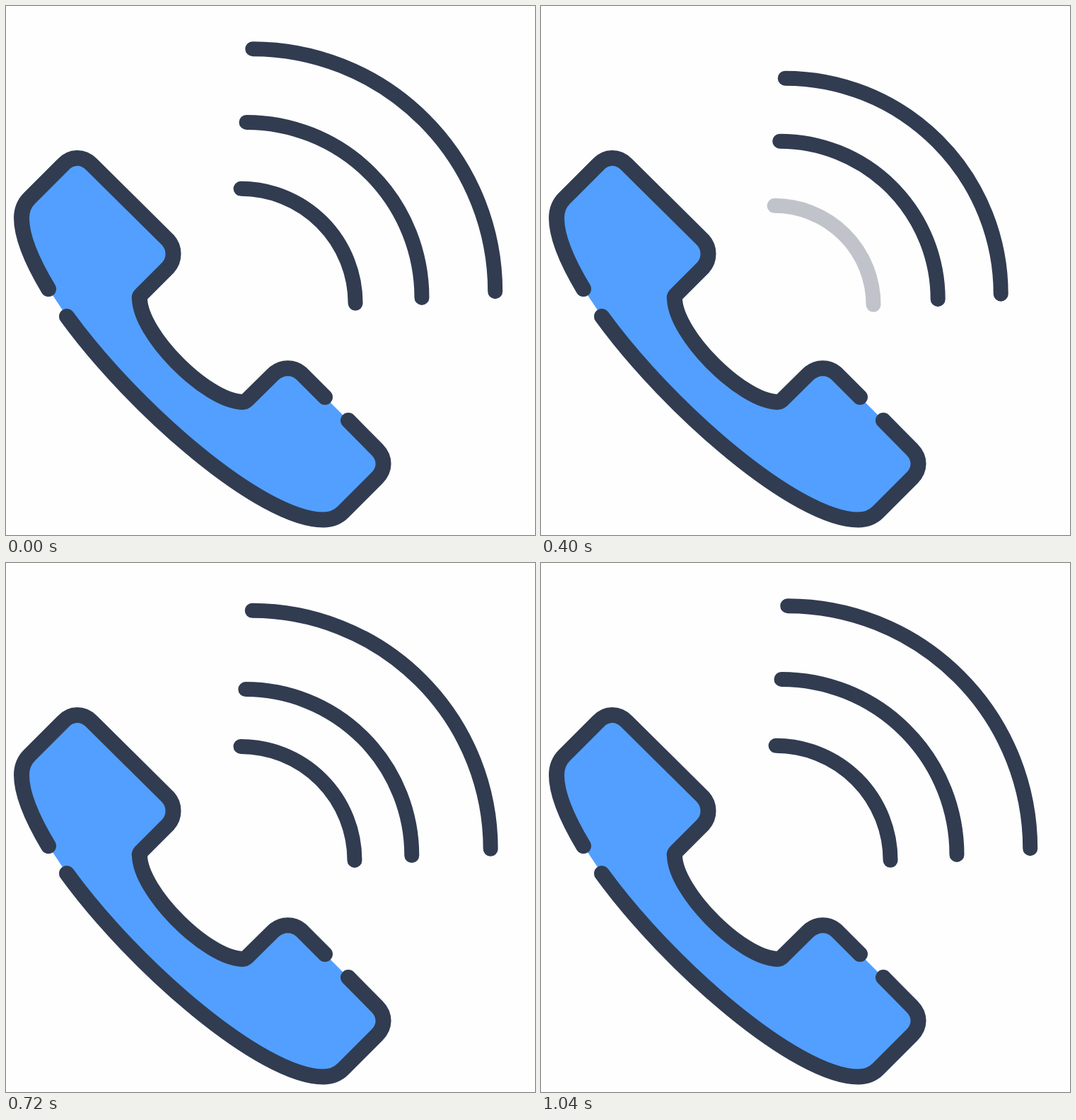
Write an HTML page that moves like this. It is 748 by 748 pixels and loops after 1.36 s.

```html
<!DOCTYPE html>
<html lang="en">
<head>
<meta charset="utf-8">
<title>Ringing phone</title>
<style>
  html, body { margin: 0; width: 100%; height: 100%; overflow: hidden; background: #fefefe; }
  svg { display: block; width: 100vw; height: 100vh; }
  .line { fill: none; stroke: #313c50; stroke-width: 22; stroke-linecap: round; stroke-linejoin: round; }
  #rings .line { stroke-width: 21; }
</style>
</head>
<body>
<svg viewBox="0 0 748 748">
  <path id="body" fill="#529fff"/>
  <path id="upper" class="line"/>
  <path id="lower" class="line"/>
  <g id="rings"></g>
</svg>
<script>
  const STEP = 80, LOOP = 1360, QUIET = 3, CYCLE = 10;
  const $ = id => document.getElementById(id);

  // Two outline strokes; joined end to end they enclose the blue body.
  const upper = "60 400C36 360 22 326 22 300C22 288 25.5 279.5 33 272L80.5 224.5" +
    "C92 212 109 212 121 224L229 331C239 342 239 359 229 370L191 408" +
    "Q188 411 189 414C190 465 283.5 558.5 334 560Q338 560 341 557L378 520.5" +
    "C390 509.5 407 509.5 418 520L451 553";
  const lower = "484 586L525 627.5C536.5 639.5 536.5 655.5 524.5 667.5L476.5 715.5" +
    "C469 723 460.5 726.5 448.5 726.5C362 726.5 182 571 86 439";
  $("upper").setAttribute("d", "M" + upper);
  $("lower").setAttribute("d", "M" + lower);
  $("body").setAttribute("d", `M${upper}L${lower}Z`);

  // Each ring travels outward through a few keys: step, radius, opacity (1 if absent).
  const rings = [
    [[0, 343], [1, 363, .155]],
    [[0, 248], [1, 282], [3, 328], [4, 356, .74], [5, 363, .12]],
    [[0, 162], [1, 198], [3, 249], [4, 286], [6, 337], [8, 367, .28]],
    [[2, 140, .3], [3, 158], [4, 181], [CYCLE, 343]],
    [[5, 143, .3], [6, 161], [8, 202], [CYCLE, 248]],
    [[9, 147, .4], [CYCLE, 162]]
  ].map(keys => {
    const path = document.createElementNS("http://www.w3.org/2000/svg", "path");
    path.setAttribute("class", "line");
    return { keys, path: $("rings").appendChild(path) };
  });

  const mix = (a, b, k) => a + (b - a) * k;

  function sample(keys, step) {
    const next = keys.findIndex(key => key[0] >= step);
    if (next < 0 || step < keys[0][0]) return null;
    const [s1, r1, a1 = 1] = keys[next];
    const [s0, r0, a0 = 1] = keys[Math.max(0, next - 1)];
    const k = s1 > s0 ? (step - s0) / (s1 - s0) : 1;
    return [mix(r0, r1, k), mix(a0, a1, k)];
  }

  // The centre drifts up and right as a ring widens.
  function arc(r) {
    const drift = (r - 158) * .092;
    const x = 331.7 + drift, y = 420.7 - drift;
    return `M${x} ${y - r}A${r} ${r} 0 0 1 ${x + r} ${y}`;
  }

  function draw(time) {
    const since = Math.floor((time % LOOP) / STEP) - QUIET;
    const step = since > 0 && since < CYCLE ? since : 0;
    for (const { keys, path } of rings) {
      const [radius, opacity] = sample(keys, step) || [1, 0];
      path.setAttribute("d", arc(radius));
      path.setAttribute("opacity", opacity);
    }
  }

  const start = performance.now();
  function tick() {
    draw(performance.now() - start);
    requestAnimationFrame(tick);
  }
  tick();
</script>
</body>
</html>
```
